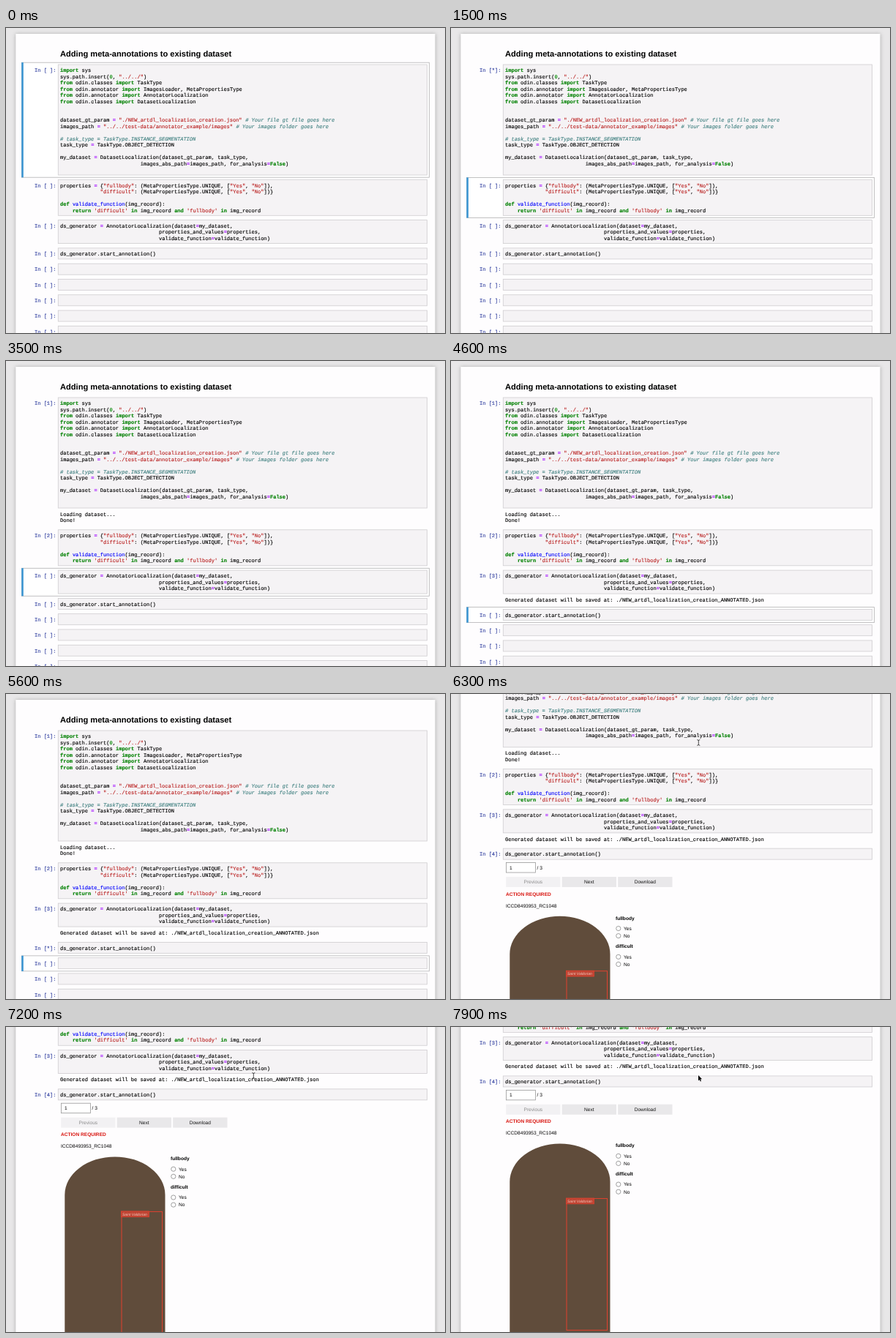
Recreate the animation shown at these times as an HTML page with a canvas. Size 600 by 417 pixels, loop 8 s.

```html
<!DOCTYPE html>
<html lang="en">
<head>
<meta charset="utf-8">
<title>Notebook annotation</title>
<style>
  html, body { margin: 0; width: 100%; height: 100%; overflow: hidden; background: #e8e7e8; }
  canvas { display: block; width: 600px; height: 417px; }
</style>
</head>
<body>
<canvas id="stage"></canvas>
<script>
const W = 600, H = 417, LOOP = 8000, STEP = 100;
const canvas = document.getElementById('stage');
const ctx = canvas.getContext('2d');
const dpr = window.devicePixelRatio || 1;
canvas.width = W * dpr;
canvas.height = H * dpr;
ctx.scale(dpr, dpr);

const CHAR = 4.22, LINE = 8.5, LEFT = 74;
const MONO = '7.03px "Liberation Mono", "Courier New", monospace';
const SANS = '"Liberation Sans", Arial, sans-serif';

// Times of the events in ms
const RUN = [1200, 2900, 4100, 5200];
const DONE = [2000, 2900, 4100, 5900];
const SCROLL_START = 6000, SCROLL_END = 278, SCROLL_TAU = 485, ARROW = 7500;

const cells = [
  { code: `import sys
sys.path.insert(0, "../../")
from odin.classes import TaskType
from odin.annotator import ImagesLoader, MetaPropertiesType
from odin.annotator import AnnotatorLocalization
from odin.classes import DatasetLocalization


dataset_gt_param = "./NEW_artdl_localization_creation.json" # Your file gt file goes here
images_path = "../../test-data/annotator_example/images" # Your images folder goes here

# task_type = TaskType.INSTANCE_SEGMENTATION
task_type = TaskType.OBJECT_DETECTION

my_dataset = DatasetLocalization(dataset_gt_param, task_type,
                          images_abs_path=images_path, for_analysis=False)
`, out: ['Loading dataset...', 'Done!'] },
  { code: `properties = {"fullbody": (MetaPropertiesType.UNIQUE, ["Yes", "No"]),
             "difficult": (MetaPropertiesType.UNIQUE, ["Yes", "No"])}

def validate_function(img_record):
    return 'difficult' in img_record and 'fullbody' in img_record`, out: [] },
  { code: `ds_generator = AnnotatorLocalization(dataset=my_dataset,
                                properties_and_values=properties,
                                validate_function=validate_function)`,
    out: ['Generated dataset will be saved at: ./NEW_artdl_localization_creation_ANNOTATED.json'] },
  { code: 'ds_generator.start_annotation()', out: [], widget: true },
  ...Array.from({ length: 6 }, () => ({ code: '', out: [] }))
];

const TOKEN = /(#.*)|("[^"]*"|'[^']*')|\b(import|from|def|return|in|and|False)\b|(=)|\b(\d+)\b|(validate_function(?=\(img))|[\w.]+|[^\s\w=#"']+/g;
const STYLES = [
  ['italic ', '#408080'], ['', '#ba2121'], ['bold ', '#008000'],
  ['bold ', '#aa22ff'], ['', '#008800'], ['', '#0000ff']
];

for (const cell of cells) {
  cell.lines = cell.code.split('\n').map(line =>
    [...line.matchAll(TOKEN)].map(m => {
      const kind = m.slice(1).findIndex(Boolean);
      const [style, color] = STYLES[kind] || ['', '#000'];
      return { text: m[0], x: LEFT + m.index * CHAR, font: style + MONO, color };
    }));
}

function text(str, x, y, font, color, align = 'left', weight = 0) {
  ctx.font = font;
  ctx.fillStyle = color;
  ctx.textAlign = align;
  ctx.fillText(str, x, y);
  if (weight) {
    ctx.lineWidth = weight;
    ctx.strokeStyle = color;
    ctx.strokeText(str, x, y);
  }
}

const mono = (str, x, y, color = '#000', font = MONO) =>
  text(str, x, y + 2.2, font, color, 'left', 0.15);

const label = (str, x, y, color = '#000', bold = '', align = 'left') =>
  text(str, x, y + 2.3, bold + '6.58px ' + SANS, color, align);

function box(x, y, w, h, fill, stroke, line = 0.8) {
  if (fill) {
    ctx.fillStyle = fill;
    ctx.fillRect(x, y, w, h);
  }
  if (stroke) {
    ctx.strokeStyle = stroke;
    ctx.lineWidth = line;
    ctx.strokeRect(x, y, w, h);
  }
}

function radios(title, y) {
  label(title, 225, y, '#000', 'bold ');
  ['Yes', 'No'].forEach((name, i) => {
    const cy = y + 14.2 + i * 10.1;
    ctx.beginPath();
    ctx.arc(228.8, cy, 3.1, 0, 7);
    ctx.fillStyle = '#fff';
    ctx.fill();
    ctx.strokeStyle = '#777';
    ctx.lineWidth = 0.7;
    ctx.stroke();
    label(name, 236, cy);
  });
}

function picture(y) {
  ctx.fillStyle = '#604c3b';
  ctx.beginPath();
  ctx.moveTo(80.3, y + 300);
  ctx.lineTo(80.3, y + 52);
  ctx.ellipse(148.9, y + 52, 68.6, 52, 0, Math.PI, 2 * Math.PI);
  ctx.lineTo(217.5, y + 300);
  ctx.fill();
  box(158, y + 75, 55.5, 180, null, '#e0412f', 1);
  box(157.5, y + 74.5, 38, 7.8, '#bf4534', '#e0412f', 0.8);
  text('Saint Valdorian', 159, y + 80.2, 'italic 5px ' + SANS, '#f3c9bd');
}

function widget(y) {
  box(75.5, y + 11.4, 40, 13.5, '#fff', '#999', 0.8);
  label('1', 80, y + 18.2);
  label('/ 3', 117.5, y + 18.2);
  ['Previous', 'Next', 'Download'].forEach((name, i) => {
    const x = 75.2 + i * 76.5;
    box(x, y + 30.8, 74.3, 14, i ? '#e9e8ea' : '#f2f1f3');
    label(name, x + 37.1, y + 37.8, i ? '#111' : '#8c8c8c', '', 'center');
  });
  label('ACTION REQUIRED', 75, y + 54.2, '#d8150f', 'bold ');
  label('ICCD8493953_RC1048', 75, y + 70.2);
  picture(y + 84.6);
  radios('fullbody', y + 87.2);
  radios('difficult', y + 126);
}

function pointer(arrow) {
  ctx.lineWidth = 0.8;
  if (arrow) {
    const shape = [[0, 0], [0, 7.4], [1.7, 5.9], [2.8, 8.5], [4, 8], [2.9, 5.4], [5.1, 5.3]];
    ctx.beginPath();
    shape.forEach(([x, y]) => ctx.lineTo(338 + x, 66 + y));
    ctx.closePath();
    ctx.strokeStyle = '#fff';
    ctx.stroke();
    ctx.fillStyle = '#000';
    ctx.fill();
    return;
  }
  ctx.strokeStyle = '#222';
  ctx.beginPath();
  ctx.moveTo(336.3, 62.6);
  ctx.quadraticCurveTo(338.3, 62.6, 338.3, 64);
  ctx.lineTo(338.3, 69);
  ctx.quadraticCurveTo(338.3, 70.3, 336.3, 70.3);
  ctx.moveTo(340.3, 62.6);
  ctx.quadraticCurveTo(338.3, 62.6, 338.3, 64);
  ctx.moveTo(338.3, 69);
  ctx.quadraticCurveTo(338.3, 70.3, 340.3, 70.3);
  ctx.stroke();
}

function drawCell(cell, i, y, t, selected) {
  const n = cell.lines.length, h = n * LINE + 6.5;
  const done = t >= DONE[i], running = t >= RUN[i];
  if (selected) {
    box(21.5, y - 2.8, 557, h + 6, '#fff', '#b3b2b4', 0.8);
    box(21.2, y - 2.9, 2.6, h + 6.2, '#3d97d3');
  }
  box(71.3, y, 504.2, h, '#f5f3f5', '#cfcdd0', 0.8);
  const mark = done ? i + 1 : running ? '*' : ' ';
  mono(`In [${mark}]:`, 39, y + 8, '#303f9f');
  cell.lines.forEach((line, r) => {
    for (const tok of line) mono(tok.text, tok.x, y + 8 + r * LINE, tok.color, tok.font);
  });
  let next = y + h + 6.3;
  if (done) {
    cell.out.forEach((str, r) => mono(str, LEFT, y + h + 8.5 + r * LINE));
    if (cell.out.length) next += cell.out.length * LINE + 6.5;
    if (cell.widget) {
      widget(y + 8);
      next += 480;
    }
  }
  return next;
}

function draw(t) {
  const scroll = t < SCROLL_START ? 0
    : SCROLL_END * (1 - Math.exp((SCROLL_START - t) / SCROLL_TAU));
  const active = RUN.filter(at => t >= at).length;

  ctx.textRendering = 'geometricPrecision';
  box(0, 0, W, H, '#e8e7e8');
  ctx.save();
  ctx.shadowColor = 'rgba(80,80,80,.35)';
  ctx.shadowBlur = 5 * dpr;
  box(13.3, 8 - scroll, 573.2, 900, '#fefdfe');
  ctx.restore();

  text('Adding meta-annotations to existing dataset', LEFT, 38.8 - scroll,
    'bold 11.1px ' + SANS, '#000');
  let y = 50 - scroll;
  cells.forEach((cell, i) => { y = drawCell(cell, i, y, t, i === active); });
  if (t >= SCROLL_START) pointer(t >= ARROW);
}

const start = performance.now();
function frame() {
  const t = (performance.now() - start) % LOOP;
  draw(Math.floor(t / STEP) * STEP);
  requestAnimationFrame(frame);
}
frame();
</script>
</body>
</html>
```
